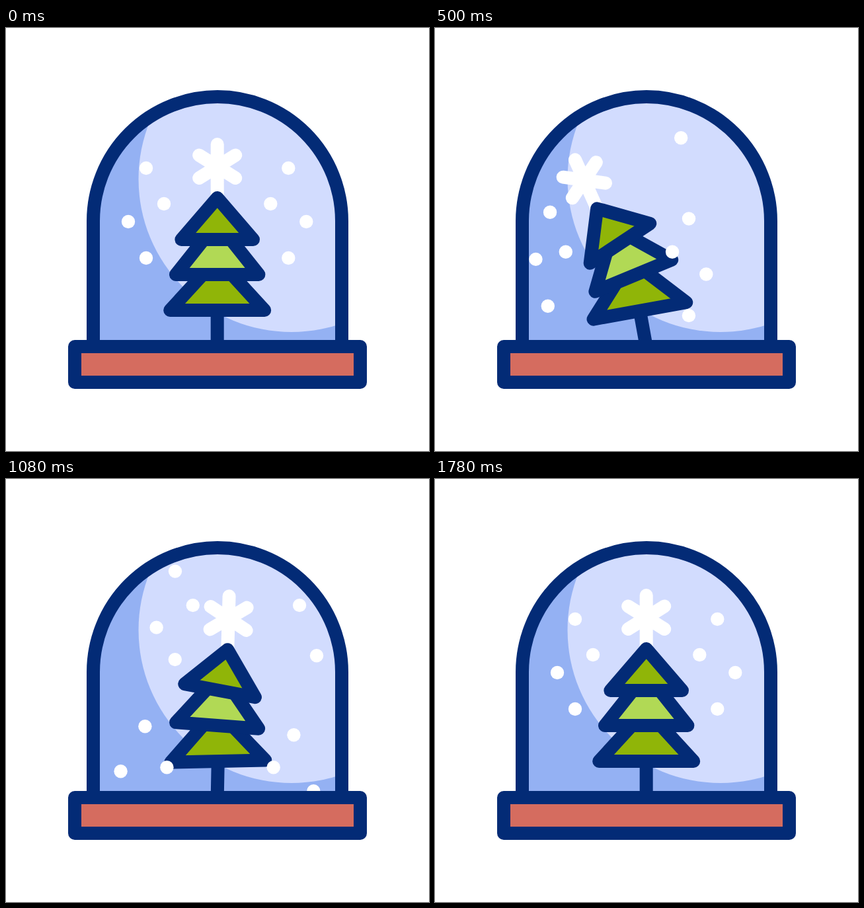
An HTML page that plays this animation: 640x640 px, repeating every 2.4 s.

```html
<!DOCTYPE html>
<html lang="en">
<head>
<meta charset="utf-8">
<title>Snow globe</title>
<style>
  html, body { margin: 0; width: 100%; height: 100%; overflow: hidden; background: #fff; }
  svg { display: block; width: 100vw; height: 100vh; }
  .ink { stroke: #032b76; stroke-width: 20; stroke-linecap: round; stroke-linejoin: round; }
  .star { stroke: #fff; stroke-width: 20; stroke-linecap: round; fill: none; }
  .dark { fill: #90b508; }
  .lime { fill: #b1d955; }
</style>
</head>
<body>
<svg viewBox="0 0 640 640">
  <defs>
    <clipPath id="dome"><path d="M132 482V292a188 188 0 0 1 376 0V482Z"/></clipPath>
  </defs>
  <g clip-path="url(#dome)">
    <rect x="120" y="90" width="400" height="400" fill="#94b1f3"/>
    <circle cx="432" cy="228.5" r="231.5" fill="#d2dcfe"/>
  </g>
  <!-- every part is drawn around its own pivot -->
  <path id="star" class="star" d="M0 0V-81M-27.5 -64.5L27.5 -30M-27.5 -30L27.5 -64.5"/>
  <path id="trunk" class="ink" d="M0 0V-55"/>
  <path id="low" class="ink dark" d="M-22 -54L-71.5 0H71.5L22 -54"/>
  <path id="mid" class="ink lime" d="M-20.5 -53L-62.7 0H62.7L20.5 -53"/>
  <path id="top" class="ink dark" d="M0 -63L-54.3 0H54.3Z"/>
  <g id="snow" clip-path="url(#dome)" fill="#fff"></g>
  <path class="ink" fill="none" d="M132 482V292a188 188 0 0 1 376 0V482"/>
  <rect class="ink" x="104" y="482" width="432" height="54" fill="#d56c5f"/>
</svg>
<script>
const LOOP = 2400, END = 1780, STEP = 20;

const easeOut = p => Math.sin(p * Math.PI / 2);
const easeInOut = p => (1 - Math.cos(p * Math.PI)) / 2;

// Left, right, left and back to rest; "lag" delays both left turns.
function swing(t, [left, right, back], lag) {
  const first = 410 + lag, second = 870, third = 1250 + lag;
  const move = (from, to, start, end, ease) => from + (to - from) * ease((t - start) / (end - start));
  if (t < first) return move(0, left, 0, first, easeOut);
  if (t < second) return move(left, right, first, second, easeInOut);
  if (t < third) return move(right, back, second, third, easeInOut);
  return move(back, 0, third, END, easeInOut);
}

// Each part stands on the one before it; "length" reaches to the next pivot.
const parts = [
  { id: "trunk", length: 55, turns: [-12.4, 11, -6], lag: 0 },
  { id: "low", length: 54, turns: [-12.4, 11, -10], lag: 0 },
  { id: "mid", length: 53, turns: [-22.6, 19, -15], lag: 80 },
  { id: "top", length: 63, turns: [-34, 26, -19], lag: 150 },
  { id: "star", length: 0, turns: [-24.5, 24, -26], lag: 70 }
];
for (const part of parts) part.node = document.getElementById(part.id);

function drawTree(t) {
  let x = 319.7, y = 482;
  for (const { node, length, turns, lag } of parts) {
    const deg = swing(t, turns, lag), rad = deg * Math.PI / 180;
    node.setAttribute("transform", `translate(${x} ${y}) rotate(${deg})`);
    x += length * Math.sin(rad);
    y -= length * Math.cos(rad);
  }
}

// Sideways offset at height y from rest: straight through rest, then a
// stretching wave that is wider at the very top.
function drift(y) {
  const s = y / (148 + y / 10), reach = s < -1 ? 58 : 44;
  return -reach * (Math.abs(s) < .5 ? 2 * s : Math.sin(Math.PI * s));
}

// Flakes speed up as they leave and slow down as they arrive.
function leave(t, lead) {
  return .135 * t + 2.1e-5 * t * t + lead * Math.min(1, t / 660);
}
function arrive(t, lead) {
  const left = END - t;
  return -.072 * left - 5e-5 * left * left - .4 * lead * Math.min(1, left / 900);
}

const snow = document.getElementById("snow");
const dots = [];
function addFlake(x, y, lead) {
  for (const fall of [leave, arrive]) {
    const node = document.createElementNS("http://www.w3.org/2000/svg", "circle");
    node.setAttribute("r", 10.2);
    snow.append(node);
    dots.push({ node, x, y, lead, fall });
  }
}

// x, y, lead of the left flake, lead of its mirror image
for (const [x, y, lead, mirrorLead] of [
  [212, 212, -8, 5], [239, 266, 0, 0], [185, 293, -21, 9], [212, 348, 0, 19]
]) {
  addFlake(x, y, lead);
  addFlake(639.3 - x, y, mirrorLead);
}

function drawSnow(t) {
  for (const { node, x, y, lead, fall } of dots) {
    const dy = fall(t, lead);
    node.setAttribute("cx", x + drift(dy));
    node.setAttribute("cy", y + dy);
  }
}

const start = performance.now();
function draw() {
  const time = Math.max(0, performance.now() - start) % LOOP;
  const t = Math.min(END, Math.floor(time / STEP) * STEP);
  drawTree(t);
  drawSnow(t);
  requestAnimationFrame(draw);
}
draw();
</script>
</body>
</html>
```
